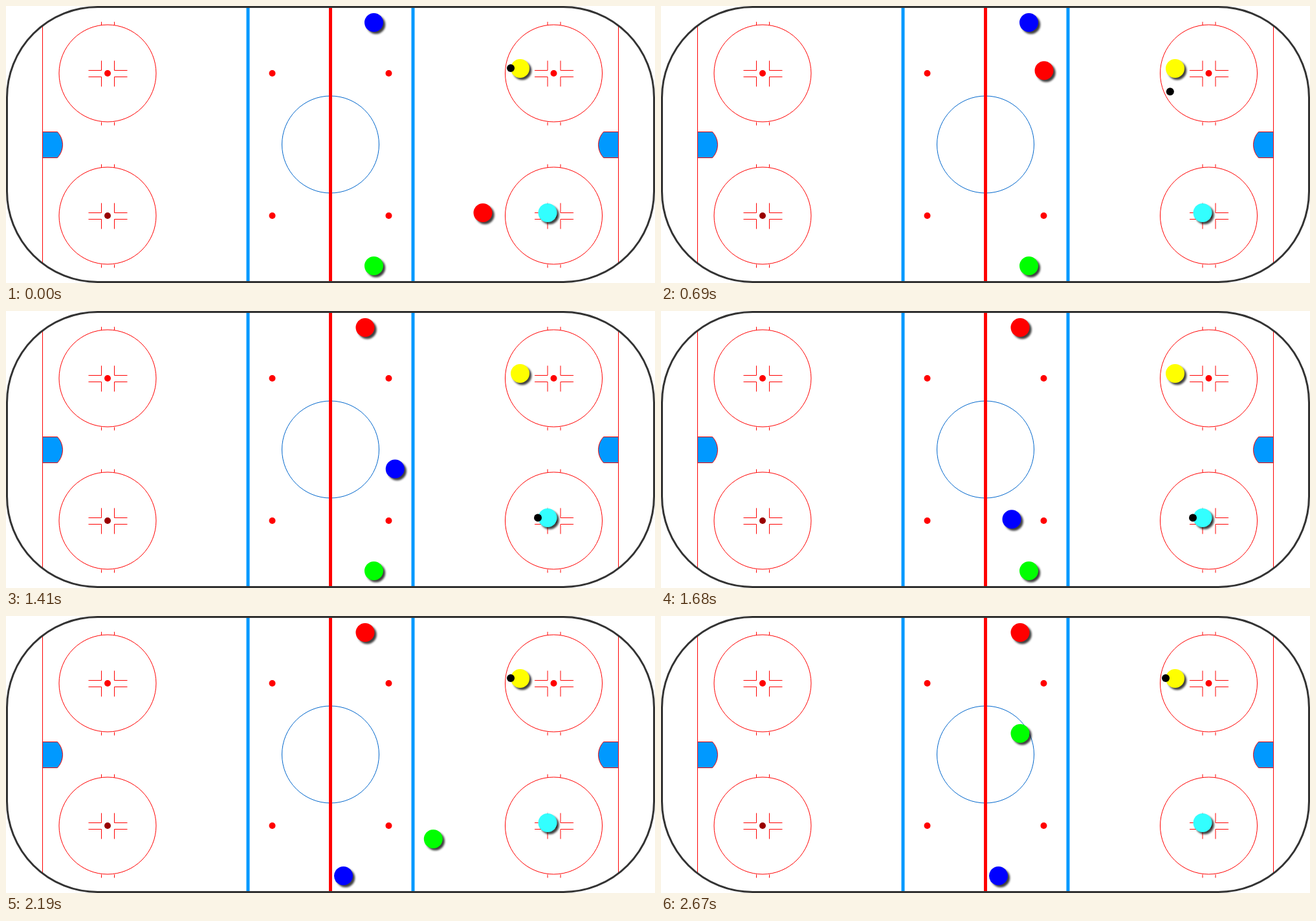
An HTML page that plays this animation: 1003x428 px, repeating every 2850 ms.

```html
<!DOCTYPE html>
<html lang="en">
<head>
<meta charset="utf-8">
<title>Hockey drill</title>
<style>
  html, body { margin: 0; width: 100%; height: 100%; overflow: hidden; background: #fff; }
  svg { display: block; width: 1003px; height: 428px; }
  .thin { fill: none; stroke: #f00; stroke-width: 1; }
  .crease { fill: #09f; stroke: #f00; stroke-width: 1; }
</style>
</head>
<body>
<svg viewBox="0 0 1003 428">
  <defs>
    <filter id="soft" x="-30%" y="-30%" width="160%" height="160%">
      <feGaussianBlur stdDeviation="1.5"/>
    </filter>
    <g id="spot">
      <circle class="thin" r="75"/>
      <path class="thin" transform="translate(.5 .5)"
        d="M-10-80v5M10-80v5M-10 75v5M10 75v5
           M-30-5h20v-15M30-5h-20v-15M-30 5h20v15M30 5h-20v15"/>
      <circle r="5" fill="currentColor"/>
    </g>
    <g id="end">
      <path class="thin" d="M56.5 30V398"/>
      <path class="crease" d="M56.5 194.5H79.5A29 29 0 0 1 79.5 234.5H56.5Z"/>
    </g>
    <g id="ball">
      <circle cx="3.2" cy="3.2" r="14.5" fill="#000" opacity=".75" filter="url(#soft)"/>
      <circle r="14.5" fill="currentColor"/>
    </g>
  </defs>

  <circle cx="501.5" cy="214" r="75" fill="none" stroke="#06c"/>
  <path d="M374 2V426M629 2V426" stroke="#09f" stroke-width="5"/>
  <path d="M501.5 2V426" stroke="#f00" stroke-width="5"/>
  <use href="#end"/>
  <use href="#end" transform="translate(1003) scale(-1 1)"/>

  <g color="#f00">
    <use href="#spot" x="157" y="104"/>
    <use href="#spot" x="157" y="324" color="#900"/>
    <use href="#spot" x="846.5" y="104"/>
    <use href="#spot" x="846.5" y="324"/>
  </g>
  <g fill="#f00">
    <circle cx="411.5" cy="104" r="5"/>
    <circle cx="411.5" cy="324" r="5"/>
    <circle cx="591.5" cy="104" r="5"/>
    <circle cx="591.5" cy="324" r="5"/>
  </g>
  <rect x="1.5" y="1.5" width="1000" height="425" rx="140" fill="none" stroke="#333" stroke-width="3"/>

  <use href="#ball" color="#ff0" x="794.5" y="96.5"/>
  <use href="#ball" color="#3ff" x="837" y="319.5"/>
  <use href="#ball" color="#0f0" id="green"/>
  <use href="#ball" color="#00f" id="blue"/>
  <use href="#ball" color="#f00" id="red"/>
  <circle id="puck" r="6"/>
</svg>
<script>
  const LOOP = 2850, STEP = 30, LAST = 2670;
  const passer = [780, 96], receiver = [822, 319.5];

  // Each move follows a Bezier curve at an even pace
  const moves = [
    { id: "red", from: 0, to: 900, path: [[737, 319.5], [737, 199], [584, 144], [555, 25.5]] },
    { id: "blue", from: 815, to: 1980, path: [[568.5, 25.5], [763, 198], [484, 300], [521.5, 401.5]] },
    { id: "green", from: 1890, to: 2670, path: [[568.5, 401.5], [700, 344], [697, 331], [555, 181.5]] },
    { id: "puck", from: 589, to: 1213, path: [passer, receiver] },
    { id: "puck", from: 1695, to: 2150, path: [receiver, passer] }
  ];

  const mix = (a, b, u) => a.map((c, k) => c + (b[k] - c) * u);

  function bezier(points, u) {
    if (points.length === 1) return points[0];
    return bezier(points.slice(1).map((p, i) => mix(points[i], p, u)), u);
  }

  function place({ id, from, to, path }, t) {
    const u = Math.min(1, Math.max(0, (t - from) / (to - from)));
    const [x, y] = bezier(path, u);
    document.getElementById(id).setAttribute("transform", `translate(${x.toFixed(2)} ${y.toFixed(2)})`);
  }

  const start = performance.now();
  function draw(now) {
    const t = Math.min(LAST, Math.floor((Math.max(0, now - start) % LOOP) / STEP) * STEP);
    moves.forEach((move, i) => {
      const begun = t >= move.from;
      const first = moves.findIndex(m => m.id === move.id) === i;
      if (begun || first) place(move, t);
    });
    requestAnimationFrame(draw);
  }
  draw(start);
</script>
</body>
</html>
```
